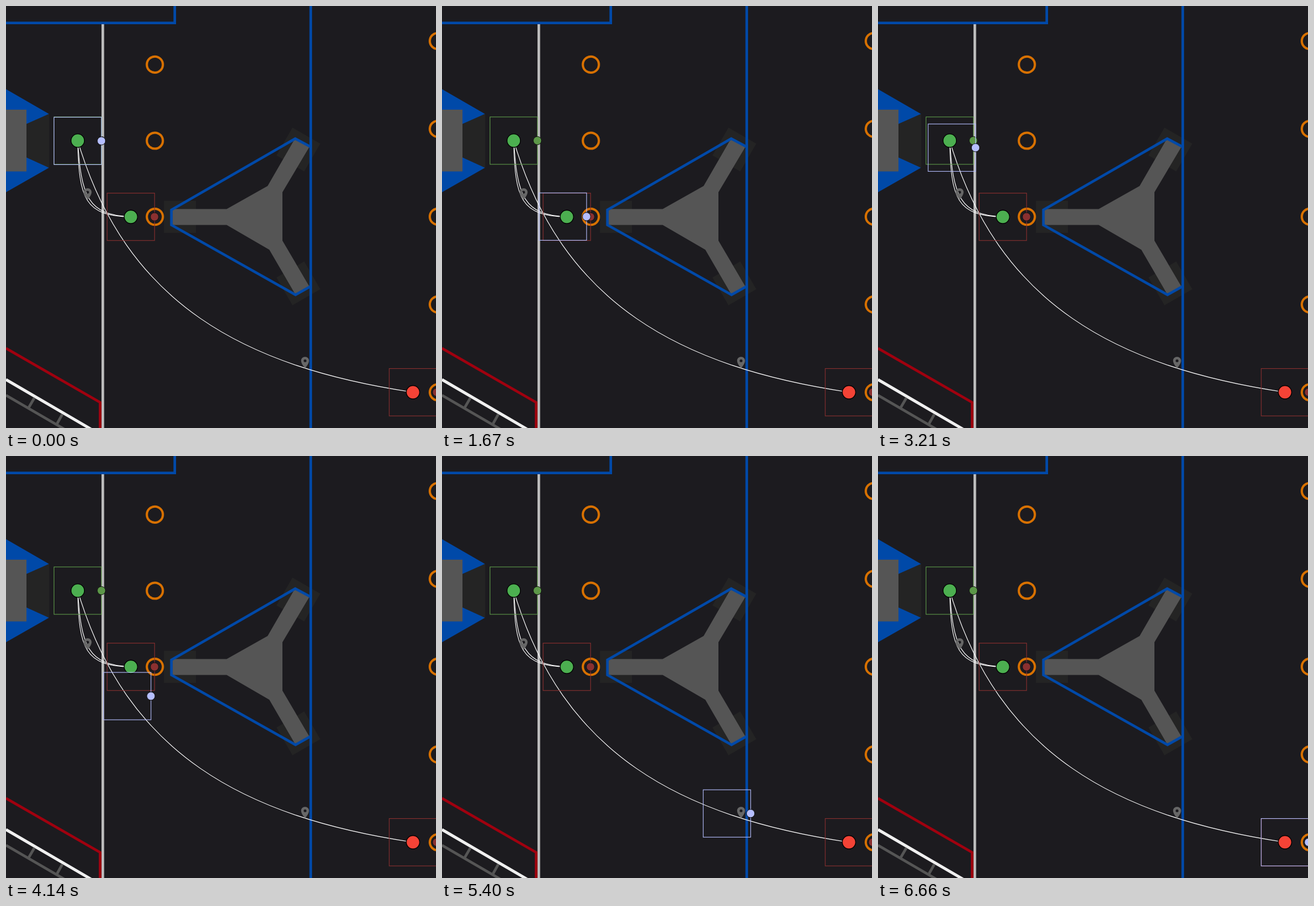
An HTML page that plays this animation: 756 px wide and 741 px high, repeating every 6.72 s.

```html
<!DOCTYPE html>
<html lang="en">
<head>
<meta charset="utf-8">
<title>Robot path preview</title>
<style>
html, body { margin: 0; width: 100%; height: 100%; overflow: hidden; background: #1c1b1f; }
svg { display: block; width: 756px; height: 741px; }
.blue { fill: none; stroke: #0049a8; stroke-width: 4.6; }
.truss { fill: #555; }
.pad { fill: #242424; }
.ring { fill: none; stroke: #d87100; stroke-width: 4; }
.path { fill: none; stroke: #fff; stroke-width: 1.15; }
.bot rect { fill: none; stroke: var(--c); stroke-width: 1.1; }
.bot circle { fill: var(--c); stroke: #111; stroke-width: 1; }
.anchor { stroke: #000; stroke-width: 1.3; }
</style>
</head>
<body>
<svg viewBox="0 0 756 741">
  <defs>
    <g id="bot" class="bot">
      <rect x="-41.7" y="-41.6" width="83.4" height="83.2"/>
      <circle cx="41.6" r="7.2"/>
    </g>
    <rect id="pad" class="pad" x="-28.2" y="-28.2" width="56.4" height="56.4"/>
    <path id="pin" fill="#676767" d="M0-20c-3.87 0-7 3.13-7 7 0 5.25 7 13 7 13s7-7.75 7-13c0-3.87-3.13-7-7-7zm0 9.5a2.5 2.5 0 1 1 0-5 2.5 2.5 0 0 1 0 5z"/>
  </defs>

  <g id="field">
    <path d="M170.2 32V741" stroke="#bdbdbd" stroke-width="4.6"/>
    <path class="blue" d="M0 29.8H296.7V0"/>
    <rect class="pad" x="36" y="190" width="40" height="93.5"/>
    <path fill="#0049a8" d="M0 146L75.5 189.5 36 207V182H0zM0 327L75.5 284 36 266V290H0z"/>
    <rect class="truss" y="182" width="36" height="108.5"/>

    <use href="#pad" transform="translate(305.8 370.2)"/>
    <use href="#pad" transform="translate(514 252) rotate(30)"/>
    <use href="#pad" transform="translate(514 487) rotate(-30)"/>
    <path class="truss" d="M292 356.5H388L460 316 508 233 533 248 486 327V412L533 492 509 507 463 428 388 384.5H292z"/>
    <path class="blue" d="M536 247.5L508.5 233 290.8 358V384.5L509 507 536 492"/>
    <path class="blue" d="M535.8 0V741"/>

    <path d="M0 601L165.5 696V741" fill="none" stroke="#a0000f" stroke-width="4.6"/>
    <path d="M0 656L152 744.5" stroke="#f0f0f0" stroke-width="5"/>
    <path d="M0 683.5L106 745M50 688L40 705M99 717L90 733" fill="none" stroke="#555" stroke-width="4.6"/>
  </g>

  <g id="paths"></g>
  <use href="#pin" x="143.5" y="340"/>
  <use href="#pin" x="525.8" y="636"/>
  <g id="stops"></g>
  <use id="robot" href="#bot" style="--c:#b5beff"/>
</svg>
<script>
const LOOP = 6720, STEP = 66.6;
const [field, paths, stops, robot] =
  ["field", "paths", "stops", "robot"].map(id => document.getElementById(id));

function add(parent, tag, attrs) {
  const el = document.createElementNS("http://www.w3.org/2000/svg", tag);
  for (const name in attrs) el.setAttribute(name, attrs[name]);
  return parent.appendChild(el);
}

function addRings(count, cx, top, gap) {
  for (let i = 0; i < count; i++) add(field, "circle", { class: "ring", cx, cy: top + i * gap, r: 14.1 });
}
addRings(3, 261.7, 102.9, 133.6);
addRings(5, 759.2, 61.5, 154.2);

function addStop(x, y, tint, fill) {
  add(stops, "use", { href: "#bot", x, y, style: `--c:${tint}` });
  add(stops, "circle", { class: "anchor", cx: x, cy: y, r: 11.7, fill });
}
addStop(126.1, 236.4, "#5c9748", "#4caf50");
addStop(219.5, 370.2, "#8a3030", "#4caf50");
addStop(715.5, 678.2, "#8a3030", "#f44336");

// Times are in steps; ramp is the time spent speeding up, and again slowing down.
const legs = [
  { d: "M126.1 236.4C128 340 139 368.5 219.5 370.2", from: -0.8, to: 21.8, ramp: 11.3 },
  { d: "M219.5 370.2C144 367 132 335 126.1 236.4", from: 22, to: 44, ramp: 11 },
  { d: "M126.1 236.4C211 523.5 419 634 715.5 678.2", from: 43.4, to: 100.4, ramp: 15.5 }
];
for (const leg of legs) {
  leg.path = add(paths, "path", { class: "path", d: leg.d });
  leg.length = leg.path.getTotalLength();
}

// Distance covered under constant acceleration, cruise and equal deceleration.
function travel({ from, to, ramp, length }, step) {
  const time = to - from, t = step - from;
  const speed = length / (time - ramp);
  const ramped = x => speed * x * x / (2 * ramp);
  if (t < ramp) return ramped(t);
  if (t > time - ramp) return length - ramped(time - t);
  return speed * (t - ramp / 2);
}

function draw(ms) {
  const step = Math.min(100, Math.floor((ms % LOOP + 5) / STEP));
  const leg = legs.find(l => step <= l.to);
  const p = leg.path.getPointAtLength(travel(leg, step));
  robot.setAttribute("transform", `translate(${p.x} ${p.y})`);
}

const start = performance.now();
function tick() {
  draw(performance.now() - start);
  requestAnimationFrame(tick);
}
tick();
</script>
</body>
</html>
```
